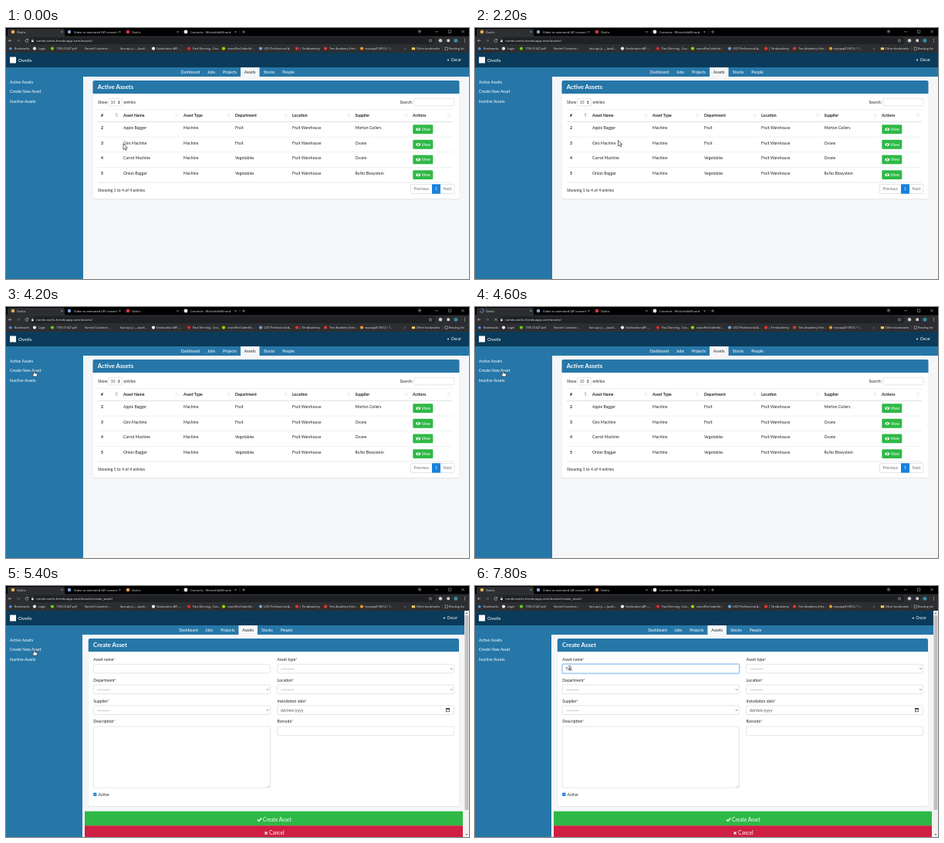
Recreate the animation shown at these times as an HTML page. Size 600 by 325 pixels, loop 8000 ms.

```html
<!DOCTYPE html>
<html lang="en">
<head>
<meta charset="utf-8">
<title>Asset manager</title>
<style>
html, body { margin: 0; width: 100%; height: 100%; overflow: hidden; background: #f5f6f8; }
svg { display: block; width: 100%; height: 100%; }
text { font-family: Lato, "Open Sans", sans-serif; font-size: 5.15px; fill: #212529; white-space: pre; }
.ui { font-family: "Open Sans", "Noto Sans", sans-serif; font-size: 3.7px; fill: #e4e5e7; }
.tab { font-size: 4px; }
.url { font-size: 4.3px; }
.b { font-weight: 700; }
.w { fill: #fff; }
</style>
</head>
<body>
<svg id="stage" viewBox="0 0 600 325" preserveAspectRatio="none"></svg>
<script>
const LOOP = 8000, STEP = 200;
const BLUE = '#2677a8', NAVY = '#0b3b5a', GREEN = '#2eb946', RED = '#cf1f43', LINE = '#dee2e6';
const stage = document.getElementById('stage');

const rect = (x, y, w, h, fill, more = '') =>
  `<rect x="${x}" y="${y}" width="${w}" height="${h}" fill="${fill}" ${more}/>`;
const text = (x, y, s, cls = '', more = '') =>
  `<text x="${x}" y="${y}" class="${cls}" ${more}>${s}</text>`;
const line = (d, color, w = 0.6, more = '') =>
  `<path d="${d}" fill="none" stroke="${color}" stroke-width="${w}" ${more}/>`;
const dot = (x, y, r, fill) => `<circle cx="${x}" cy="${y}" r="${r}" fill="${fill}"/>`;
const group = (id, body) => `<g id="${id}">${body}</g>`;
const MID = 'text-anchor="middle"', END = 'text-anchor="end"';
const cross = (x, y, r, color, w) =>
  line(`M${x - r} ${y - r}l${2 * r} ${2 * r}m0 ${-2 * r}l${-2 * r} ${2 * r}`, color, w);

function browser() {
  const icon = '#d5d6d8';
  const bookmarks = [
    [37, '#f1f1f1', 'Login', 42], [60, '#62d413', '1706.01427.pdf', 65],
    [98, '#2b2c2f', 'Vantrel Customer...', 102], [144, '#2b2c2f', 'face-api.js — JavaS...', 148],
    [191, '#f4f4f4', 'Geolocation API -...', 195], [237, '#e0262b', 'Paul Denning - Coa...', 242],
    [282, '#8ee000', 'soundForCoderfol...', 287], [330, '#6ba6dc', 'UCD Professional A...', 334],
    [377, '#e8342c', '| TernAcademy', 380.5], [414, '#e8342c', 'Tern Academy Sche...', 419],
    [461, '#e99a2c', 'mpcapp01:8012 / 1...', 465]
  ];
  let s = rect(0, 0, 600, 12, '#000') + rect(0, 10.5, 600, 21.5, '#2d2e31');
  s += '<path d="M0 11Q2 11 2 9V3Q2 1 4 1H74Q76 1 76 3V9Q76 11 78 11Z" fill="#2d2e31"/>';
  s += dot(82, 5, 2.2, '#7da7d8') + text(88, 6.5, 'Video to animated GIF converte', 'ui tab');
  s += text(163, 6.5, 'Ovelis', 'ui tab');
  s += dot(233, 5, 2.4, '#f4f4f4') + text(239, 6.5, 'Commits · Winterfold8/nord', 'ui tab');
  s += [72.5, 147.5, 222.5, 297.5].map(x => rect(x - 3, 2, 6, 6, x < 75 ? '#2d2e31' : '#000') + cross(x, 5, 1.1, icon, 0.5)).join('');
  s += [154, 229, 303].map(x => line(`M${x} 2.5v5.5`, '#55565a', 0.4)).join('');
  s += line('M306 5h4M308 3v4', icon, 0.5);
  s += dot(536, 4.5, 2.4, '#3a3b3e') + line('M535 4l1 1l1 -1', icon, 0.5);
  s += line('M556 4.8h4M573.4 3h3.4v3.4h-3.4z', icon, 0.45) + cross(592, 4.7, 1.7, icon, 0.5);
  s += line('M7.3 16.3H3.5M5.2 14.6L3.5 16.3L5.2 18', icon, 0.6);
  s += line('M14 16.3H17.8M16.1 14.6L17.8 16.3L16.1 18', '#77797d', 0.6);
  s += rect(30.5, 12, 526, 9, '#202124', 'rx="4.5"');
  s += rect(33, 16, 2.8, 2.2, icon) + line('M33.6 16v-1a.8.8 0 0 1 1.6 0v1', icon, 0.4);
  s += line('M550 14.3l.6 1.4l1.5.1l-1.1 1l.4 1.4l-1.4-.8l-1.4.8l.4-1.4l-1.1-1l1.5-.1z', icon, 0.4);
  s += dot(563, 16.3, 2.2, '#c9cbce') + rect(571.5, 14.6, 3.4, 3.4, icon, 'rx=".6"') + dot(583, 16.3, 2.7, '#1b7488');
  s += text(583, 17.8, 'O', 'ui', MID);
  s += [14.5, 16.3, 18.1].map(y => dot(594.5, y, 0.5, icon)).join('');
  s += '<path d="M5.8 24.1l.8 1.7l1.8.2l-1.3 1.2l.3 1.8l-1.6-.9l-1.6.9l.3-1.8l-1.3-1.2l1.8-.2z" fill="#4a94f0"/>';
  s += text(11, 27.9, 'Bookmarks', 'ui');
  s += bookmarks.map(([x, c, t, tx]) => dot(x, 26.6, 2.1, c) + text(tx, 27.9, t, 'ui')).join('');
  s += text(516, 28, '»', 'ui') + rect(525.8, 25.2, 4.4, 3, '#f4cf63', 'rx=".4"') + text(532, 27.9, 'Other bookmarks', 'ui');
  s += line('M565.5 24v5', '#606165', 0.4) + rect(569, 25, 3.4, 3.4, 'none', `stroke="${icon}" stroke-width=".5"`);
  s += text(574, 27.9, 'Reading list', 'ui');
  return s;
}

function siteNav(shift, side, right) {
  const items = [['Dashboard', 239], ['Jobs', 266], ['Projects', 290], ['Assets', 316.2], ['Stocks', 341], ['People', 366]];
  let s = rect(0, 32, 600, 293, '#f5f6f8') + rect(0, 32, right, 19, NAVY) + rect(0, 51, right, 12, BLUE);
  s += rect(0, 63, side, 262, BLUE) + rect(304 - shift, 51, 24.5, 12, '#f5f6f8');
  s += items.map(([t, x]) => text(x - shift, 58.8, t, t === 'Assets' ? '' : 'w', MID)).join('');
  s += rect(5, 37.5, 8, 8, '#fff') + text(16, 43.8, 'Ovelis', 'w', 'style="font-size:6.4px"');
  s += dot(573 - shift * 2, 41.5, 0.9, '#fff') + text(590 - shift * 2, 43.2, 'Oscar', 'w', END);
  s += ['Active Assets', 'Create New Asset', 'Inactive Assets'].map((t, i) => text(5, 71.8 + i * 12.6, t, 'w')).join('');
  return s;
}

function card(x, right, bottom, title) {
  const w = right - x;
  return rect(x - 0.4, 69, w + 0.8, bottom - 68, '#e3e6e9', 'rx="2.5"') +
    rect(x, 68, w, bottom - 68, '#fff', 'rx="2"') +
    `<path d="M${x} 85V70q0-2 2-2H${right - 2}q2 0 2 2V85Z" fill="${BLUE}"/>` +
    text(x + 6.3, 79.4, title, 'w b', 'style="font-size:7.75px"');
}

const field = (x, y, w, h, stroke = '#ced4da') =>
  rect(x, y, w, h, '#fff', `rx="1.2" stroke="${stroke}" stroke-width=".6"`);
const chevron = (x, y) => line(`M${x - 1.2} ${y - 0.6}l1.2 1.2l1.2-1.2`, '#343a40', 0.7);

function listPage() {
  const cols = [123, 152, 230, 297, 371, 452.5, 527];
  const sorts = [144, 221.5, 288.5, 362.5, 444, 518.5, 574];
  const heads = ['#', 'Asset Name', 'Asset Type', 'Department', 'Location', 'Supplier', 'Actions'];
  const rows = [
    ['Apple Bagger', 'Fruit', 'Morton Coilers'], ['Giro Machine', 'Fruit', 'Ovane'],
    ['Carrot Machine', 'Vegetables', 'Ovane'], ['Onion Bagger', 'Vegetables', 'RuNo Biosystem']
  ];
  let s = siteNav(0, 100, 600) + card(112.5, 587.5, 221, 'Active Assets');
  s += text(119, 97.9, 'Show') + field(133, 91.3, 17.5, 9.8) + text(135.5, 97.9, '10', '', 'style="fill:#495057"');
  s += '<path d="M145 95.7l1.3-1.7l1.3 1.7zM145 96.7l1.3 1.7l1.3-1.7z" fill="#343a40"/>' + text(152.5, 97.9, 'entries');
  s += text(527, 97.9, 'Search:', '', END) + field(529, 91.3, 52, 9.6);
  s += rect(119, 105, 460, 0.5, LINE) + rect(119, 121, 460, 1, LINE);
  heads.forEach((h, i) => {
    const x = sorts[i];
    s += text(cols[i], 115, h, 'b');
    s += line(`M${x - 1} 115.2v-4.4m-.8 .9l.8-.9l.8.9`, i ? '#d3d6d9' : '#4a4f54', 0.45);
    s += line(`M${x + 1.2} 110.8v4.4m-.8-.9l.8.9l.8-.9`, '#d3d6d9', 0.45);
  });
  rows.forEach(([name, dept, supplier], i) => {
    const y = 131 + i * 19.65;
    [i + 2, name, 'Machine', dept, 'Fruit Warehouse', supplier].forEach((t, c) => s += text(cols[c], y, t, c ? '' : 'b'));
    s += rect(527.3, y - 5.8, 26, 11.8, GREEN, 'rx="1.3"') + text(538.5, y + 2, 'View', 'w');
    s += `<ellipse cx="534.2" cy="${y + 0.2}" rx="2.9" ry="1.9" fill="#fff"/>` + dot(534.2, y + 0.2, 1.2, GREEN) + dot(534.2, y + 0.2, 0.5, '#fff');
    s += rect(119, y + 9.8, 460, 0.5, i < 3 ? LINE : '#cfd3d7');
  });
  s += text(119, 212.2, 'Showing 1 to 4 of 4 entries');
  s += field(524.5, 202.5, 56.5, 12) + rect(552, 202.3, 11, 12.3, '#1781dc');
  s += text(538.3, 210.4, 'Previous', '', MID + ' style="fill:#6c757d"') + text(557.5, 210.4, '1', 'w', MID);
  return s + text(572, 210.4, 'Next', '', MID + ' style="fill:#6c757d"');
}

function formPage() {
  const star = '<tspan fill="#8a4a50">*</tspan>';
  const L = 113.3, R = 351.6, W = 229;
  const label = (x, y, t) => text(x, y, t + star);
  const select = (x, y) => field(x, y, W, 11.6) + text(x + 4.7, y + 7.6, '---------', '', 'style="fill:#495057"') + chevron(x + W - 3.2, y + 5.9);
  let s = siteNav(2.6, 99, 594) + card(106.8, 587, 285, 'Create Asset');
  s += label(L, 97, 'Asset name') + field(L, 101.3, W, 11.6);
  s += label(R, 97, 'Asset type') + select(R, 101.3);
  s += label(L, 123.8, 'Department') + select(L, 128.1);
  s += label(R, 123.8, 'Location') + select(R, 128.1);
  s += label(L, 150.6, 'Supplier') + select(L, 154.9);
  s += label(R, 150.6, 'Installation date') + field(R, 154.9, W, 11.6) + text(R + 4.5, 162.6, 'dd/mm/yyyy', '', 'style="fill:#495057"');
  s += rect(570.6, 158.8, 4, 4, 'none', 'stroke="#222" stroke-width=".6"') + rect(570.4, 158.2, 4.4, 1.5, '#222');
  s += label(L, 177.4, 'Description') + field(L, 182, W, 79.2) + line('M341.3 258.2l-2.5 2.5M341.3 259.6l-1.1 1.1', '#888', 0.4);
  s += label(R, 177.4, 'Barcode') + field(R, 182, W, 11.6);
  s += rect(113.2, 267.8, 4.2, 4.2, '#0b75d8', 'rx=".6"') + line('M114 270l.9.9l1.7-1.9', '#fff', 0.6) + text(119.5, 272, 'Active');
  s += rect(102, 291.7, 490, 18.5, GREEN) + rect(102, 310.2, 490, 14.8, RED);
  const big = 'style="font-size:6.6px"';
  s += line('M326 302.5l1.7 1.7l3.6-3.7', '#fff', 1.3) + text(333, 304.6, 'Create Asset', 'w', big);
  s += cross(337, 320, 1.6, '#fff', 1.2) + text(341, 322.4, 'Cancel', 'w', big);
  s += rect(594, 32, 6, 293, '#f1f1f1') + rect(594.6, 38, 4.8, 252, '#c1c1c1');
  s += '<path d="M595.6 36l1.4-1.8l1.4 1.8zM595.6 321l1.4 1.8l1.4-1.8z" fill="#555"/>';
  s += group('focus', rect(L - 0.7, 100.6, W + 1.4, 13, 'none', 'rx="1.8" stroke="#c3defb" stroke-width="1.4"') + field(L, 101.3, W, 11.6, '#69aef0'));
  s += text(117.3, 108.9, '', '', 'id="typed" style="fill:#495057"');
  return s + rect(0, 104.2, 0.5, 5.8, '#222', 'id="caret"');
}

stage.innerHTML = group('list', listPage()) + group('form', formPage()) + browser() +
  group('favicon', dot(9, 5, 2.3, '#e2b04a')) +
  group('spinner', line('M9 2.8a2.2 2.2 0 1 1-2.2 2.2', '#8ab4f8', 0.7)) +
  dot(158, 5, 2.3, '#d9363e').replace('<circle', '<circle id="icon3"') +
  text(14, 6.5, '', 'ui tab', 'id="title"') + text(39, 17.9, '', 'ui url', 'id="url"') +
  group('reload', line('M28.4 15.2a1.9 1.9 0 1 0 .4 1.6M28.7 14.1v1.5h-1.5', '#d5d6d8', 0.55)) +
  group('stop', cross(27, 16.3, 1.5, '#d5d6d8', 0.6)) +
  group('arrow', '<path d="M0 0V7.4L1.8 5.8L3 8.4L4.2 7.9L3.1 5.3H5.4Z" fill="#fff" stroke="#111" stroke-width=".6"/>') +
  group('hand', '<path d="M-.7.5Q0-.5.7.5V3L3.4 3.7Q4.2 4 4 5L3.5 7.5H-.6L-2.6 4.7Q-2.3 3.6-.7 4.8Z" fill="#fff" stroke="#111" stroke-width=".6"/>') +
  group('ibeam', line('M-1.4-2.8Q0-2.8 0-2Q0-2.8 1.4-2.8M0-2V2M-1.4 2.8Q0 2.8 0 2Q0 2.8 1.4 2.8', '#222', 0.6));

const el = {};
stage.querySelectorAll('[id]').forEach(n => el[n.id] = n);
const show = (id, on) => el[id].setAttribute('visibility', on ? 'visible' : 'hidden');
const put = (id, s) => { if (el[id].textContent !== s) el[id].textContent = s; };

// Pointer path: time, x, y
const path = [
  [0, 152, 150], [1000, 187, 145], [1400, 187, 145], [2200, 185.5, 145.5], [2600, 145.5, 117.5],
  [3800, 36.5, 82.5], [5400, 36.5, 82.5], [6000, 122.5, 106], [LOOP, 122.5, 106]
];
function pointer(t) {
  const i = path.findIndex(p => p[0] > t);
  const [t0, x0, y0] = path[i - 1], [t1, x1, y1] = path[i];
  const u = (t - t0) / (t1 - t0), k = u * u * (3 - 2 * u);
  return [x0 + (x1 - x0) * k, y0 + (y1 - y0) * k];
}

function draw(time) {
  const t = Math.floor(time % LOOP / STEP) * STEP;
  const form = t >= 5400, busy = t >= 4600 && !form, sent = t >= 5000;
  show('list', !form);
  show('form', form);
  show('favicon', !busy);
  show('spinner', busy);
  show('reload', !busy);
  show('stop', busy);
  el.icon3.setAttribute('fill', sent ? '#e2a04a' : '#d9363e');
  put('title', sent && !form ? 'https://norde-ovelis.herokuap' : 'Ovelis');
  put('url', 'norde-ovelis.herokuapp.com/assets/' + (sent ? 'create_asset/' : ''));

  const typed = 'Tra'.slice(0, Math.max(0, (t - 7200) / STEP));
  put('typed', typed);
  show('focus', t >= 6400);
  show('caret', t >= 6400 && t < 6800 || t >= 7400);
  el.caret.setAttribute('x', 117.3 + (typed ? el.typed.getComputedTextLength() : 0));

  const [x, y] = pointer(t);
  const kind = form && x > 113 && y > 101 ? 'ibeam' : x < 46 && y > 79 && y < 88 ? 'hand' : 'arrow';
  for (const id of ['arrow', 'hand', 'ibeam']) show(id, id === kind);
  el[kind].setAttribute('transform', `translate(${x} ${y})`);
}

const start = performance.now();
function tick() {
  draw(performance.now() - start);
  requestAnimationFrame(tick);
}
tick();
</script>
</body>
</html>
```
